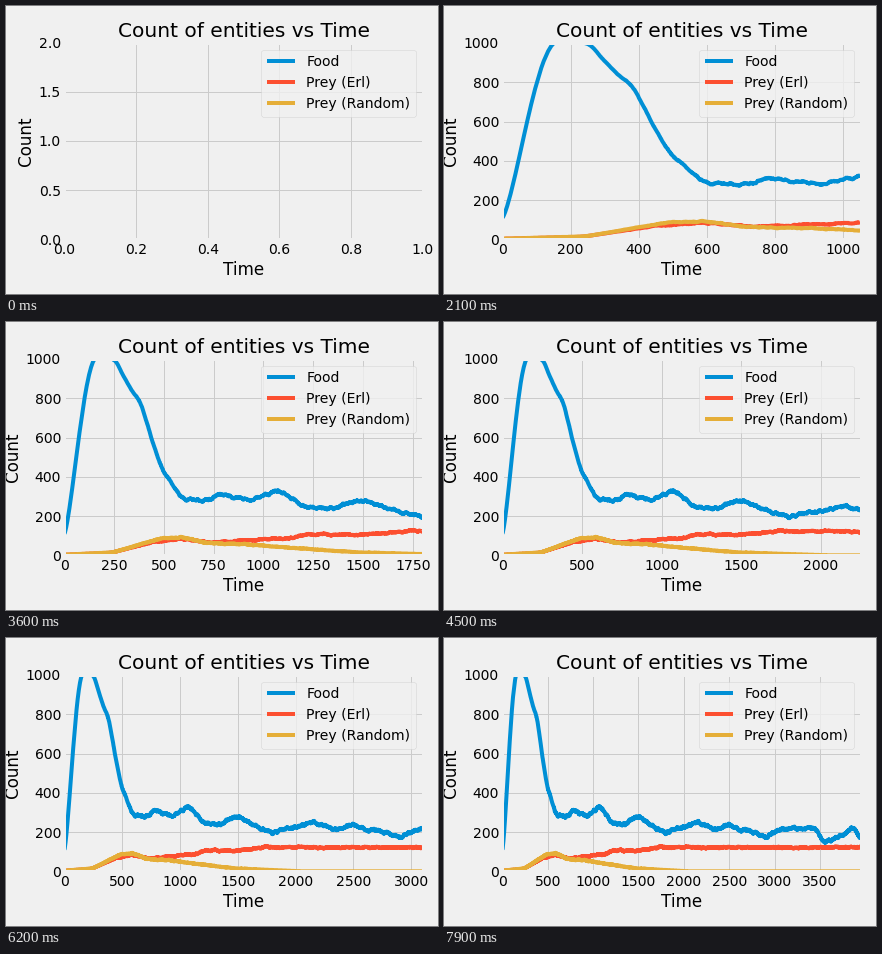
Animation, 432 px wide and 288 px high, one loop 8 s. Source, as a matplotlib script:

```python
import numpy as np
import matplotlib.pyplot as plt
from matplotlib.animation import FuncAnimation

FRAMES = 80
STEP = 50  # simulation ticks added per frame
CAP = 1000

plt.style.use("fivethirtyeight")
plt.rcParams["font.family"] = "DejaVu Sans"

rng = np.random.default_rng(7)
ticks = np.arange(FRAMES * STEP)


def trend(*points, window=41):
    """Straight runs between key points with softened corners."""
    line = np.interp(ticks, *zip(*points))
    padded = np.pad(line, window // 2, mode="edge")
    return np.convolve(padded, np.ones(window) / window, mode="valid")


def wobble(base, jitter):
    """Mean-reverting noise that fades in and vanishes near zero."""
    noise = np.zeros(ticks.size)
    for i, kick in enumerate(rng.normal(0, jitter, ticks.size - 1), 1):
        noise[i] = 0.94 * noise[i - 1] + kick
    noise *= np.clip((ticks - 250) / 300, 0, 1) * np.clip(base / 60, 0, 1)
    return np.clip(np.round(base + noise), 0, CAP)


# Food grows to the cap, is grazed down, then swings around a low level.
growth = 110 + 900 * np.sin(np.pi / 2 * np.clip(ticks / 165, 0, 1)) ** 1.35
grazed = trend(
    (258, CAP), (283, 937), (356, 809), (378, 797), (451, 553), (501, 420),
    (523, 400), (592, 288), (708, 275), (790, 317), (934, 274), (1071, 336),
    (1212, 246), (1323, 233), (1474, 280), (1574, 256), (1796, 196),
    (2160, 250), (2357, 211), (2494, 240), (2634, 203), (2711, 212),
    (2914, 172), (3012, 209), (3442, 222), (3544, 150), (3709, 173),
    (3864, 224), (3950, 166),
)
erl = trend(
    (0, 3), (235, 13), (450, 69), (600, 86), (680, 71), (800, 66),
    (1000, 82), (1100, 83), (1230, 106), (1530, 106), (1700, 122),
)
wild = trend(
    (0, 3), (245, 15), (490, 88), (600, 92), (680, 71), (760, 60),
    (880, 59), (1300, 26), (1500, 14), (2050, 0),
)
data = {
    "Food": wobble(np.minimum(growth, grazed), 1.3),
    "Prey (Erl)": wobble(erl, 0.7),
    "Prey (Random)": wobble(wild, 0.5),
}

fig, ax = plt.subplots(figsize=(6, 4), dpi=72)
fig.subplots_adjust(left=58.4 / 432, right=416.88 / 432,
                    bottom=54.7 / 288, top=251.4 / 288)
lines = [ax.plot([], [], label=name)[0] for name in data]
ax.set_title("Count of entities vs Time")
ax.set_xlabel("Time")
ax.set_ylabel("Count")
ax.legend(loc="best")


def update(frame):
    n = frame * STEP
    for line, counts in zip(lines, data.values()):
        line.set_data(ticks[:n], counts[:n])
    top = max(counts[:n].max(initial=0) for counts in data.values())
    ax.set_xlim(0, n + 1)
    ax.set_ylim(0, top + 2)
    return lines


anim = FuncAnimation(fig, update, frames=FRAMES, interval=1000 // 10,
                     init_func=lambda: update(0), repeat=True, repeat_delay=0)
plt.show()
```
